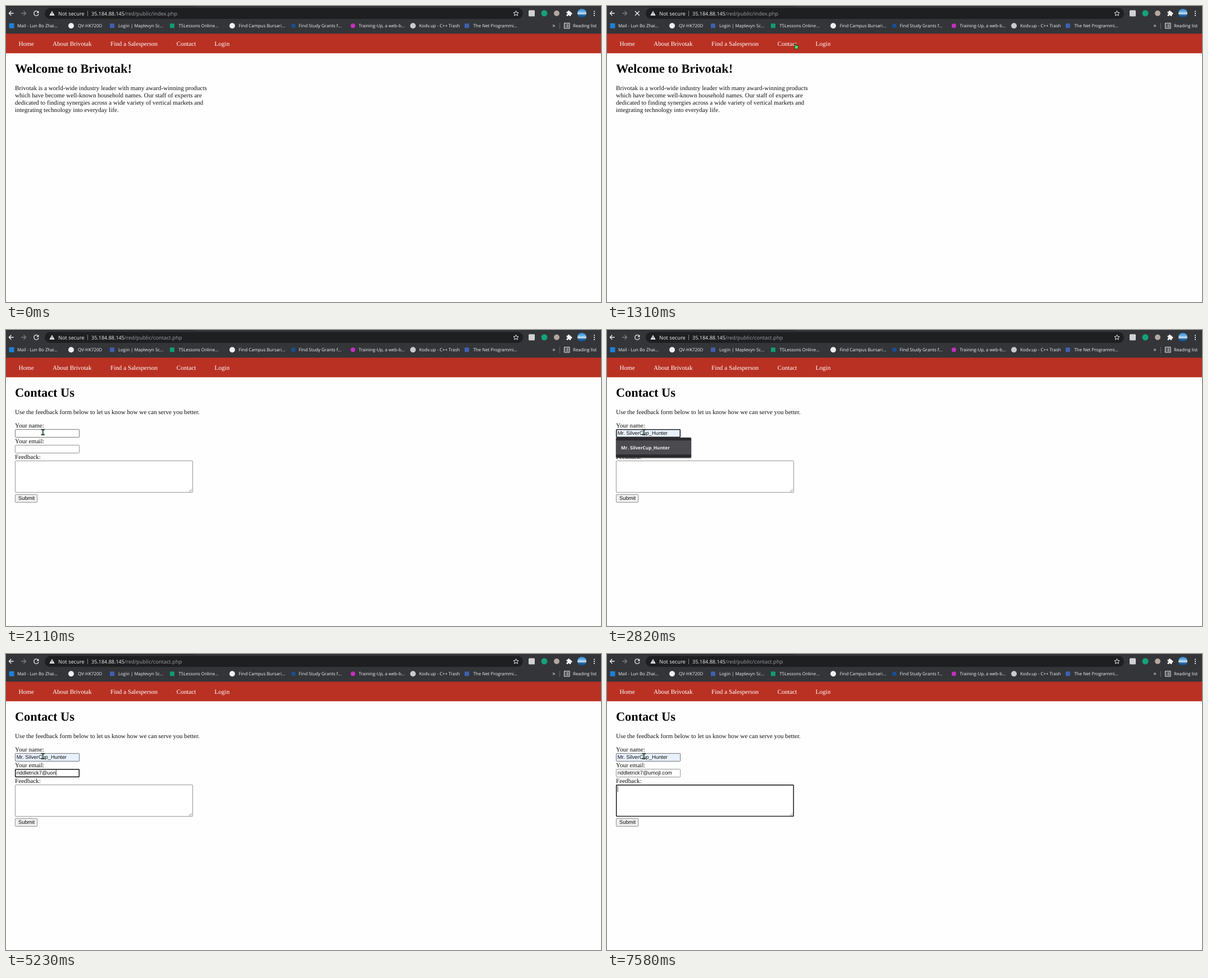
An HTML page that plays this animation: 1060x528 px, repeating every 8 s.

```html
<!DOCTYPE html>
<html lang="en">
<head>
<meta charset="utf-8">
<title>Contact form</title>
<style>
  html, body { margin: 0; width: 100%; height: 100%; overflow: hidden; background: #fefefe; }
  svg { display: block; width: 100vw; height: 100vh; }
  text { text-rendering: geometricPrecision; white-space: pre; }
  .ui { font-family: "Open Sans", "Noto Sans", sans-serif; fill: #f1f1f2; }
  .bookmark { font-size: 7.9px; }
  .page { font: 11.15px "Liberation Serif", "Times New Roman", serif; fill: #111; }
  .page .heading { font-size: 22.3px; font-weight: bold; fill: #000; }
  .nav { fill: #fff; }
  .field { font: 9.333px "Liberation Sans", Arial, sans-serif; fill: #111; }
  .box { fill: #fff; stroke: #767676; stroke-width: .8; }
  .ring { fill: none; stroke: #101010; stroke-width: 1.4; }
  .line { fill: none; stroke: #f1f1f2; stroke-width: 1.3; }
  .caret { stroke: #222; stroke-width: .8; }
</style>
</head>
<body>
<svg viewBox="0 0 1060 528" preserveAspectRatio="none">
  <defs>
    <linearGradient id="sky" x2="0" y2="1">
      <stop stop-color="#2f86cf"/><stop offset=".35" stop-color="#6fb4e6"/>
      <stop offset=".52" stop-color="#d3e6f2"/><stop offset=".7" stop-color="#2468a8"/><stop offset="1" stop-color="#143f73"/>
    </linearGradient>
  </defs>
  <rect width="1060" height="528" fill="#fefefe"/>

  <!-- Browser toolbar -->
  <rect width="1060" height="50" fill="#343538"/>
  <rect width="336" height="1" fill="#232427"/>
  <rect x="69" y="3.5" width="852" height="19.5" rx="9.75" fill="#1e1f21"/>
  <path class="line" d="M13.6 13H5.4M9.3 9L5.3 13l4 4"/>
  <path class="line" style="stroke:#7d7e82" d="M27 13h8.400M31.500 9l4 4-4 4"/>
  <g id="reload">
    <path class="line" d="M57 10.300A4.200 4.200 0 1 0 58 14.200"/>
    <path d="M58.400 8.400v4.200h-4.200z" fill="#f1f1f2"/>
  </g>
  <path id="stop" class="line" d="M50 9.200l7.800 7.800m0-7.800l-7.800 7.800"/>
  <path d="M82 8.800l4.600 8.200h-9.200z" fill="#f1f1f2"/>
  <path d="M82 11.600v2.600m0 .8v1" stroke="#1e1f21"/>
  <path d="M145.500 8.500v9.500" stroke="#85868a"/>
  <g class="ui">
    <text x="93" y="16.500" font-size="9.25">Not secure</text>
    <text x="152" y="16.500" font-size="9.05">35.184.88.145</text>
    <text id="path" x="211" y="16.500" font-size="9.3" fill="#9aa0a6"></text>
  </g>
  <path class="line" style="stroke-width:1" d="M908.500 8.600l1.300 3 3.200.3-2.400 2.100.7 3.200-2.800-1.700-2.800 1.700.7-3.200-2.400-2.100 3.200-.3z"/>
  <rect x="931" y="7.500" width="11" height="11" rx="1.500" fill="#d2d2d2"/>
  <circle cx="959" cy="13" r="5.500" fill="#15a27c"/>
  <circle cx="981" cy="13" r="5" fill="#b3a79f"/>
  <g fill="#f4f4f4">
    <rect x="998.500" y="10" width="8" height="8" rx="1"/>
    <circle cx="1002.500" cy="9.600" r="1.600"/><circle cx="1007" cy="13.500" r="1.600"/>
    <g fill="#343538"><circle cx="998.700" cy="14" r="1.400"/><circle cx="1002.500" cy="18" r="1.400"/></g>
  </g>
  <circle cx="1026" cy="13" r="8" fill="url(#sky)"/>
  <g fill="#f1f1f2"><circle cx="1048" cy="9.500" r="1.100"/><circle cx="1048" cy="13.200" r="1.100"/><circle cx="1048" cy="16.900" r="1.100"/></g>

  <!-- Bookmarks -->
  <g id="bookmarks" class="ui bookmark"></g>
  <path d="M986.500 30v11" stroke="#66676b"/>
  <path class="line" style="stroke-width:1" d="M994.500 30.500h9.500v9.500h-9.500zM996 33h1.200m1.200 0h4M996 35.300h1.200m1.200 0h4M996 37.600h1.200m1.200 0h4"/>

  <!-- Page -->
  <rect y="49.300" width="1060" height="35" fill="#b93123"/>
  <g class="page">
    <g class="nav">
      <text x="22.400" y="71">Home</text>
      <text x="83" y="71">About Brivotak</text>
      <text x="186" y="71">Find a Salesperson</text>
      <text x="303.800" y="71">Contact</text>
      <text x="371.600" y="71">Login</text>
    </g>
    <g id="home">
      <text class="heading" x="16" y="119">Welcome to Brivotak!</text>
      <text x="16" y="150">Brivotak is a world-wide industry leader with many award-winning products</text>
      <text x="16" y="162.800">which have become well-known household names. Our staff of experts are</text>
      <text x="16" y="175.700">dedicated to finding synergies across a wide variety of vertical markets and</text>
      <text x="16" y="188.500">integrating technology into everyday life.</text>
    </g>
    <g id="contact">
      <text class="heading" x="16" y="119">Contact Us</text>
      <text x="16" y="150">Use the feedback form below to let us know how we can serve you better.</text>
      <text x="16" y="174">Your name:</text>
      <text x="16" y="202">Your email:</text>
      <text x="16" y="230">Feedback:</text>
      <rect id="nameBox" class="box" x="16.400" y="177.350" width="114.200" height="14" rx="1"/>
      <rect class="box" x="16.400" y="205.450" width="114.200" height="14" rx="1"/>
      <rect class="box" x="16.400" y="233.400" width="316.200" height="56.300" rx="1"/>
      <path d="M326 288.500l5-5m-2.500 5l2.500-2.500" stroke="#777" stroke-width=".8"/>
      <rect class="box" x="16.400" y="293.400" width="39.400" height="14" rx="1.500" style="fill:#efefef"/>
      <rect id="ring" class="ring" x="16.700" rx="1"/>
      <g class="field">
        <text x="22" y="303.300">Submit</text>
        <text id="name" x="18.800" y="187.300"></text>
        <text id="email" x="18.800" y="215.300"></text>
      </g>
      <path id="caret" class="caret" d="M0 0v10.500"/>
      <g id="dropdown">
        <rect x="15" y="191" width="136" height="39" rx="3" opacity=".18"/>
        <rect x="16" y="192" width="134" height="36" rx="2" fill="#2b2b2f"/>
        <rect id="option" x="16" y="197" width="134" height="25" fill="#4b4b4f"/>
        <text id="optionText" class="ui" x="25" y="212.800" font-size="8.2" font-weight="700"></text>
      </g>
    </g>
  </g>

  <!-- Pointer shapes -->
  <g id="pointer" stroke-linejoin="round">
    <path id="arrow" d="M.5.5v9.200l2.200-2 1.500 3 1.500-.7-1.400-2.900h3z" fill="#3fc45c" stroke="#10301a" stroke-width=".8"/>
    <path id="hand" d="M2.500 6V1.200q.8-1.200 1.600 0V4l3.100.8q1.300.4 1.100 1.800L7.700 9.800q-.3 1-1.300 1H4.200q-.8 0-1.300-.8L.9 7.200q-.2-1.200 1.600-1.200z" fill="#4fe06c" stroke="#10301a" stroke-width=".9"/>
    <g id="beam" fill="none">
      <path d="M.6.8h6.300M3.700.8v9M.6 9.800h6.300" stroke="#1d3a25" stroke-width="1.900"/>
      <path d="M3.700 1.200v8.200" stroke="#3f8a52" stroke-width=".6"/>
    </g>
  </g>
</svg>

<script>
const $ = id => document.getElementById(id);
const show = (id, on) => { $(id).style.display = on ? '' : 'none'; };
const LOOP = 8000;
const FULL_NAME = 'Mr. SilverCup_Hunter';

// icon kind, icon x, size, colour, label x, label
const bookmarks = [
  ['square', 10, 9, '#1f7fd6', 20, 'Mail - Lun Bo Zhai...'],
  ['circle', 116, 10, '#eeeeee', 128, 'QV-HK720D'],
  ['square', 189, 8, '#3e60ae', 200, 'Login | Maplevyn Sc...'],
  ['square', 296, 8, '#0d9c74', 307.5, 'T5Lessons Online...'],
  ['circle', 403, 10, '#eeeeee', 414.5, 'Find Campus Bursari...'],
  ['square', 512, 7, '#174f94', 521.5, 'Find Study Grants f...'],
  ['circle', 618, 8, '#c42fc0', 628.5, 'Training-Up, a web-b...'],
  ['circle', 725, 10, '#c9c9cb', 736, 'Kodv.up - C++ Trash'],
  ['square', 821, 8, '#3e60ae', 832.5, 'The Net Programmi...'],
];
$('bookmarks').innerHTML = bookmarks.map(([kind, x, size, color, labelX, label]) =>
  `<rect x="${x - size / 2}" y="${35.3 - size / 2}" width="${size}" height="${size}" rx="${kind === 'circle' ? size / 2 : 1}" fill="${color}"/>
   <text x="${labelX}" y="38.300">${label}</text>`).join('') +
  '<text x="973.500" y="38" font-size="10">»</text><text x="1010" y="38.300">Reading list</text>';

$('optionText').textContent = FULL_NAME;

const emailSteps = [
  [0, ''], [3980, 'riddletrick7'], [4450, '@'], [4840, '@u'], [5070, '@uo'],
  [5230, '@uon'], [5390, '@uonp'], [5700, '@uon'], [5850, '@uo'], [5930, '@u'],
  [6320, '@um'], [6470, '@umo'], [6550, '@umoj'], [6700, '@umojl'], [6860, '@umojl.'],
  [7020, '@umojl.c'], [7100, '@umojl.co'], [7270, '@umojl.com'],
].map(([at, s]) => [at, s.startsWith('@') ? 'riddletrick7' + s : s]);

const latest = (steps, t) => steps.filter(([at]) => at <= t).pop();

// Eight discrete pointer samples along an eased line
function glide(t, start, end, from, to) {
  const step = Math.min(8, Math.floor((t - start) / ((end - start) / 7) + 1e-3) + 1);
  const u = step / 8, p = u * u * (3 - 2 * u);
  return from.map((v, i) => v + (to[i] - v) * p);
}

const LINK = [332.5, 66], REST = [509, 270], NAME = [62, 177];

function pointerAt(t) {
  if (t < 130) return null;
  if (t < 210) return [728, 405];
  if (t < 460) return REST;
  if (t < 1550) return glide(t, 460, 1000, REST, LINK);
  return glide(t, 1550, 2110, LINK, NAME);
}

function drawPointer(t) {
  const spot = pointerAt(t);
  show('pointer', spot);
  if (!spot) return;
  const [x, y] = spot;
  const kind = t >= 2110 ? 'beam' : y < 84 && x > 295 ? 'hand' : 'arrow';
  for (const id of ['arrow', 'hand', 'beam']) show(id, id === kind);
  $('pointer').setAttribute('transform', `translate(${x} ${y})`);
}

function drawFocus(t) {
  const focus = t < 2340 ? null : t < 3050 ? 'name' : t < 7580 ? 'email' : 'feedback';
  const [top, width, height] = { name: [177.6, 113.6, 13.5], email: [205.7, 113.6, 13.5], feedback: [233.7, 315.6, 55.7] }[focus] || [0, 0, 0];
  show('ring', focus);
  $('ring').setAttribute('y', top);
  $('ring').setAttribute('width', width);
  $('ring').setAttribute('height', height);

  const blinkedOff = t >= 3590 && t < 3980;
  const previewing = t >= 2820 && t < 3050;
  const caretX = 19.2 + (focus === 'email' ? $('email').getComputedTextLength() : 0);
  const caretY = { name: 179, email: 206.6, feedback: 235.5 }[focus];
  show('caret', focus && !blinkedOff && !previewing);
  $('caret').setAttribute('transform', `translate(${caretX} ${caretY || 0})`);
}

function draw(t) {
  const onContact = t >= 1390, filled = t >= 2820;
  show('home', !onContact);
  show('contact', onContact);
  const loading = t >= 1230 && t < 1390;
  show('stop', loading);
  show('reload', !loading);
  $('path').textContent = `/red/public/${onContact ? 'contact' : 'index'}.php`;

  $('nameBox').style.fill = filled ? '#e8f0fe' : '#fff';
  $('nameBox').style.stroke = t >= 2110 ? '#4f4f4f' : '#767676';
  $('name').textContent = filled ? FULL_NAME : '';
  $('email').textContent = latest(emailSteps, t)[1];
  show('dropdown', t >= 2340 && t < 3050);
  show('option', filled);
  show('optionText', true);

  drawFocus(t);
  drawPointer(t);
}

const start = performance.now();
function tick() {
  draw((performance.now() - start) % LOOP);
  requestAnimationFrame(tick);
}
tick();
</script>
</body>
</html>
```
